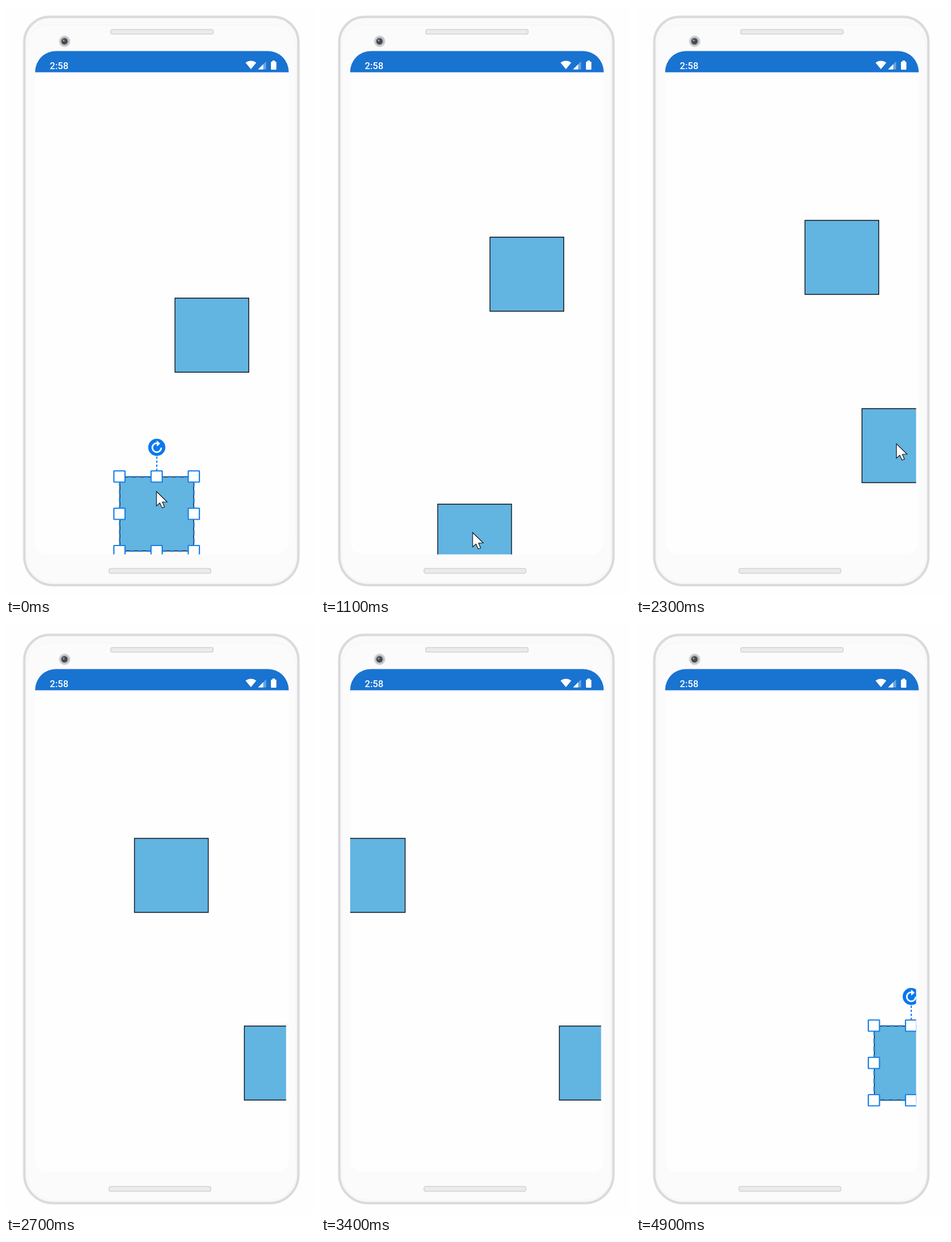
An HTML page with a canvas for the animation above (5 s loop, 540 by 1028 pixels).

```html
<!DOCTYPE html>
<html lang="en">
<head>
<meta charset="utf-8">
<title>Dragging a shape with auto-scroll</title>
<style>
html, body { margin: 0; width: 100%; height: 100%; overflow: hidden; background: #fffeff; }
canvas { display: block; width: 540px; height: 1028px; }
</style>
</head>
<body>
<canvas id="stage"></canvas>
<script>
const W = 540, H = 1028, LOOP = 5000, STEP = 100;
const SIZE = 129, FRAME = 130, SCROLL = 0.295;
const PAPER = '#fffeff', LINE = '#1a80e8', BAR = '#1973d1';
const canvas = document.getElementById('stage');
const ctx = canvas.getContext('2d');
const ratio = window.devicePixelRatio || 1;
canvas.width = W * ratio;
canvas.height = H * ratio;
ctx.scale(ratio, ratio);

const clamp = (v, lo, hi) => Math.min(hi, Math.max(lo, v));
const ramp = (t, from, to) => clamp((t - from) / (to - from), 0, 1);
const glide = (t, from, to) => {
  const u = ramp(t, from, to);
  return u * u * (3 - 2 * u);
};

function paint(fill, stroke, width) {
  if (fill) { ctx.fillStyle = fill; ctx.fill(); }
  if (stroke) { ctx.strokeStyle = stroke; ctx.lineWidth = width; ctx.stroke(); }
}

function round(x, y, w, h, r, fill, stroke, width) {
  ctx.beginPath();
  ctx.roundRect(x, y, w, h, r);
  paint(fill, stroke, width);
}

function disc(x, y, r, fill) {
  ctx.beginPath();
  ctx.arc(x, y, r, 0, Math.PI * 2);
  paint(fill);
}

function poly(points, fill, stroke, width) {
  ctx.beginPath();
  points.forEach(([x, y]) => ctx.lineTo(x, y));
  ctx.closePath();
  paint(fill, stroke, width);
}

function drawPhone() {
  ctx.fillStyle = PAPER;
  ctx.fillRect(0, 0, W, H);
  round(32, 19, 479, 990, [44, 44, 50, 50], '#fbfafb', '#e8e7e9', 5);
  round(32, 19, 479, 990, [44, 44, 50, 50], null, '#d9d8db', 3);
  round(36, 33, 471, 971, [38, 38, 45, 45], '#fcfbfc', '#f5f4f6', 1);
  round(51, 79, 443, 876.5, [36, 36, 22, 22], PAPER);
  round(183, 41, 179, 8, 3, '#ebebeb', '#d3d3d4', 1.5);
  round(180, 980, 178, 8.5, 3, '#ebebeb', '#d3d3d4', 1.5);
  disc(102.5, 61.5, 10, '#d2d2d3');
  disc(102.5, 61.5, 7.6, '#b4b6b8');
  disc(102.2, 61.5, 5.5, '#454a51');
  disc(100.8, 60, 1.8, '#8a98a5');
}

function drawSignal(size, fill) {
  poly([[440.5, 110.5], [440.5 + size, 110.5 - size], [440.5 + size, 110.5]], fill);
}

function drawStatus() {
  round(51, 78.5, 443, 37, [36, 36, 0, 0], BAR);
  ctx.fillStyle = '#fff';
  ctx.font = '500 16.5px Roboto, sans-serif';
  ctx.fillText('2:58', 76.5, 109.5);
  ctx.beginPath();
  ctx.moveTo(428, 110);
  ctx.arc(428, 110, 14.6, -Math.PI / 2 - 0.7, -Math.PI / 2 + 0.7);
  paint('#fff');
  drawSignal(14, '#68a4e2');
  drawSignal(9, '#fff');
  round(463, 97, 9.5, 14, 1.2, '#fff');
  ctx.fillRect(465.5, 95, 4.5, 3);
}

function drawBox(x, y) {
  ctx.beginPath();
  ctx.rect(x, y, SIZE, SIZE);
  paint('#62b4e1', '#0a1218', 1.4);
}

function drawRotator(x, y) {
  disc(x, y, 15, '#0a78ee');
  ctx.beginPath();
  ctx.arc(x, y + 0.5, 7.8, 0, Math.PI * 1.55);
  paint(null, '#fff', 2.8);
  poly([[x, y - 12], [x + 6, y - 6.5], [x, y - 1.5]], '#fff');
}

function drawSelection(boxX, boxY) {
  const x = boxX - 0.5, y = boxY - 0.5, half = FRAME / 2;
  const mid = x + half, top = y - 51;
  ctx.setLineDash([8, 6]);
  ctx.beginPath();
  ctx.rect(x, y, FRAME, FRAME);
  paint(null, LINE, 2.2);
  ctx.setLineDash([4, 3]);
  ctx.beginPath();
  ctx.moveTo(mid, top + 16);
  ctx.lineTo(mid, y - 10);
  paint(null, LINE, 2.2);
  ctx.setLineDash([]);

  for (let i = 0; i < 9; i++) {
    if (i === 4) continue;
    const hx = x + (i % 3) * half, hy = y + Math.floor(i / 3) * half;
    round(hx - 10, hy - 10, 19.5, 19.5, 0.5, '#fff', LINE, 2.2);
  }
  drawRotator(mid, top);
}

function drawCursor(x, y) {
  ctx.save();
  ctx.translate(x, y);
  poly([[0, 0], [0, 25], [5.8, 20], [9.8, 28.5], [14, 26.7], [10.3, 18.4], [18.5, 18]],
    '#fff', '#151515', 1.2);
  ctx.restore();
}

function draw(t) {
  drawPhone();
  drawStatus();
  ctx.save();
  ctx.beginPath();
  ctx.rect(51, 116, 438.5, 839.5);
  ctx.clip();

  // The view scrolls up, then left, while the drag rests on an edge.
  const up = clamp(SCROLL * (t - 740), 0, 135.5);
  const left = Math.max(0, SCROLL * (t - 2460));
  drawBox(295.3 - left, 509 - up);

  // Pull down to the bottom edge, then sweep to the right edge.
  const pull = ramp(t, 300, 700);
  const x = 199 + 5 * pull + 212.5 * glide(t, 1630, 2465);
  const y = 820.5 + 47.5 * pull - 167.5 * glide(t, 1660, 2330);
  drawBox(x, y);
  if (t < 300 || t >= 4200) drawSelection(x, y);
  drawCursor(263 + 2 * pull + 227 * glide(t, 1580, 2547),
    846 + 23 * ramp(t, 0, 300) + 48.5 * pull - 160.5 * glide(t, 1628, 2387));
  ctx.restore();
}

const start = performance.now();
function tick() {
  const t = (performance.now() - start) % LOOP;
  draw(Math.floor(t / STEP) * STEP);
  requestAnimationFrame(tick);
}
tick();
</script>
</body>
</html>
```
